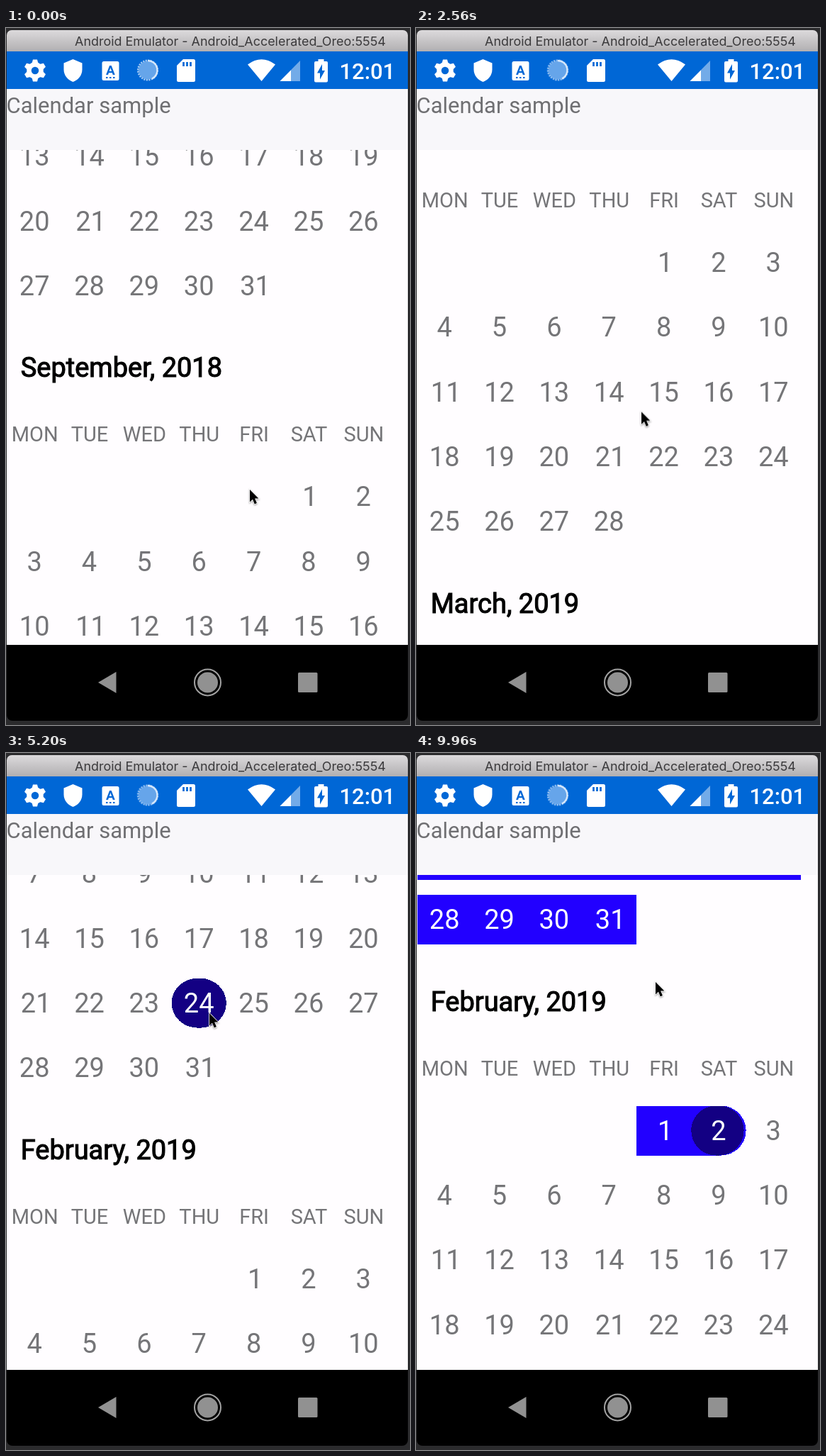
Write an HTML page that moves like this. It is 570 by 983 pixels and loops after 10000 ms.

```html
<!DOCTYPE html>
<html lang="en">
<head>
<meta charset="utf-8">
<title>Calendar sample</title>
<style>
html, body { margin: 0; width: 100%; height: 100%; overflow: hidden; background: #2b2b2d; }
svg { display: block; width: 570px; height: 983px; font-family: Roboto, sans-serif; }
.mid { text-anchor: middle; }
.day { font-size: 38px; fill: #757578; }
.week { font-size: 29px; fill: #757578; }
.month { font-size: 38px; fill: #000; stroke: #000; stroke-width: 1.1px; }
.sel { opacity: 0; animation: 10s step-end infinite; }
.sel .day { fill: #fff; }
.range, .end { shape-rendering: crispEdges; }
.range { fill: #2200ff; }
.end { fill: #130083; }
#ring { transform-origin: 200px 59.5px; animation: turn 4s linear infinite; }
#list { animation: scroll 10s linear infinite; }
#cursor { animation: point 10s linear infinite; }

@keyframes turn { to { transform: rotate(360deg); } }
@keyframes pick0 { 0% { opacity: 1; } 50.4% { opacity: 0; } }
@keyframes pick1 { 50.4% { opacity: 1; } 59.6% { opacity: 0; } }
@keyframes pick2 { 59.6% { opacity: 1; } 76% { opacity: 0; } }
@keyframes pick3 { 76% { opacity: 1; } 87.6% { opacity: 0; } }
@keyframes pick4 { 87.6%, 100% { opacity: 1; } }

/* position of the February heading */
@keyframes scroll {
  0% { transform: translateY(3884px); }
  2% { transform: translateY(3876px); }
  4.5% { transform: translateY(3600px); animation-timing-function: cubic-bezier(.33, .67, .67, 1); }
  14.8%, 23.5% { transform: translateY(99px); }
  25.6% { transform: translateY(148px); }
  29% { transform: translateY(267px); animation-timing-function: ease-out; }
  33%, 36.4% { transform: translateY(343px); }
  38.8% { transform: translateY(456px); animation-timing-function: ease-out; }
  42%, 94% { transform: translateY(559px); }
  99%, 100% { transform: translateY(350px); }
}
@keyframes point {
  0% { transform: translate(344px, 651px); }
  2% { transform: translate(344px, 645px); }
  4.5% { transform: translate(336px, 385px); }
  14.8% { transform: translate(324px, 378px); animation-timing-function: ease-in-out; }
  23.5% { transform: translate(320px, 492px); }
  25.6% { transform: translate(318px, 541px); }
  29% { transform: translate(325px, 660px); animation-timing-function: ease-in-out; }
  34%, 36.4% { transform: translate(342px, 590px); }
  38.8% { transform: translate(351px, 703px); }
  40% { transform: translate(350px, 712px); }
  42% { transform: translate(345px, 683px); animation-timing-function: ease-in-out; }
  49% { transform: translate(290px, 370px); }
  52% { transform: translate(287px, 367px); animation-timing-function: ease-in-out; }
  58%, 61% { transform: translate(430px, 745px); animation-timing-function: ease-in-out; }
  66% { transform: translate(511px, 772px); animation-timing-function: ease-in-out; }
  74.5%, 77% { transform: translate(430px, 745px); animation-timing-function: ease-in-out; }
  82.8% { transform: translate(257px, 320px); }
  86%, 89% { transform: translate(272px, 265px); animation-timing-function: ease-in-out; }
  93.5%, 94% { transform: translate(331px, 532px); }
  99%, 100% { transform: translate(338px, 323px); }
}
</style>
</head>
<body>
<svg viewBox="0 0 570 983">
  <defs>
    <linearGradient id="bar" x2="0" y2="1">
      <stop stop-color="#dcdadc"/><stop offset="1" stop-color="#b1afb1"/>
    </linearGradient>
    <clipPath id="view"><path d="M1 172H567V870H1Z"/></clipPath>
  </defs>

  <path d="M1 33V10a7 7 0 0 1 7-7H560a7 7 0 0 1 7 7V33Z" fill="url(#bar)"/>
  <text x="97" y="25" font-size="17.95" fill="#3b3a3c" style="font-family: Inter, sans-serif">Android Emulator - Android_Accelerated_Oreo:5554</text>
  <path d="M1 86H567V870H1Z" fill="#fffdff"/>
  <path d="M1 33H567V86H1Z" fill="#0067d6"/>
  <path d="M1 86H567V172H1Z" fill="#f8f7fa"/>
  <text x="0.5" y="119.5" font-size="31" fill="#6f6f72">Calendar sample</text>

  <g fill="#fff">
    <g id="gear" transform="translate(41 60)">
      <circle r="8.5" fill="none" stroke="#fff" stroke-width="6.5"/>
    </g>
    <path d="M94.500 44L107.500 49.500V58.500C107.500 66.500 102 73.500 94.500 76C87 73.500 81.500 66.500 81.500 58.500V49.500Z"/>
    <rect x="135.5" y="47" width="24" height="27" rx="2.5"/>
    <text class="mid" x="147.5" y="66" font-size="19" font-weight="700" fill="#0067d6">A</text>
    <path d="M141 70h2.500m2.500 0h2.500m2.500 0h2.500" stroke="#0067d6" stroke-width="2.2"/>
    <circle cx="200" cy="59.5" r="13" fill="#66a5ea"/>
    <circle id="ring" cx="200" cy="59.5" r="13.8" fill="none" stroke="#a5caf4" stroke-width="2.4" stroke-dasharray="2.2 1.4"/>
    <path d="M200 46a13.500 13.500 0 0 1 6 25.600" fill="none" stroke="#d5e7fb" stroke-width="2.4"/>
    <path d="M250 44H264.500a2.500 2.500 0 0 1 2.500 2.500V73.500a2.500 2.500 0 0 1-2.500 2.500H243.500a2.500 2.500 0 0 1-2.500-2.500V53Z"/>
    <path d="M250.500 48v6m5-6v6m5-6v6" stroke="#0067d6" stroke-width="2.7"/>
    <path d="M341 51.500Q360.500 37 380 51.500L360.500 75Z"/>
    <path d="M415 46V75H386.500Z" opacity=".45"/>
    <path d="M402 59.500V75H386.500Z"/>
    <path d="M440.500 47V44H448.500V47H452a2 2 0 0 1 2 2V74.500a2 2 0 0 1-2 2H437a2 2 0 0 1-2-2V49a2 2 0 0 1 2-2Z"/>
    <path d="M446 51V60H450L443 72.500V63.500H439Z" fill="#0067d6"/>
    <text x="470.5" y="71.5" font-size="31" font-weight="500">12:01</text>
  </g>

  <g clip-path="url(#view)"><g id="list"></g></g>

  <path d="M1 870H567V969a8 8 0 0 1-8 8H9a8 8 0 0 1-8-8Z"/>
  <g fill="#919191">
    <path d="M130 923L155.500 908V938Z"/>
    <circle cx="284.5" cy="923" r="14.5"/>
    <circle cx="284.5" cy="923" r="18.5" fill="none" stroke="#a2a2a2" stroke-width="2"/>
    <rect x="412" y="909" width="27.5" height="28" rx="1.5"/>
  </g>

  <g id="cursor">
    <path d="M0 0V17.500L4 13.800L6.800 20.400L9.900 19L7.100 12.600H12.400Z" stroke="#fff" stroke-width="1.6" paint-order="stroke" style="filter: drop-shadow(0 1px 1px #0006)"/>
  </g>
</svg>
<script>
const NS = 'http://www.w3.org/2000/svg';
const COL = 77.35, ROW = 91.33, CELL = 70, FIRST = 182, AFTER = 115.5;
const list = document.getElementById('list');
const days = [];

function add(parent, tag, attrs, text) {
  const el = document.createElementNS(NS, tag);
  for (const k in attrs) el.setAttribute(k, attrs[k]);
  if (text !== undefined) el.textContent = text;
  return parent.appendChild(el);
}

function box(parent, cls, x, y, width, rx = 0) {
  add(parent, 'rect', { class: cls, x, y: y - CELL / 2 + 0.5, width, height: CELL, rx });
}

// A closing 1 is centred by its narrow ink, so it sits further right.
function label(parent, d) {
  const shift = d.n % 10 === 1 ? 2 : 0;
  add(parent, 'text', { class: 'day mid', x: d.x + COL / 2 + shift, y: d.y + 13.8 }, d.n);
}

// Draws one month below its heading and returns where the next one starts.
function month(year, m, top) {
  const first = new Date(year, m, 1);
  const name = first.toLocaleString('en-US', { month: 'long' });
  const lead = (first.getDay() + 6) % 7;
  const count = new Date(year, m + 1, 0).getDate();
  add(list, 'text', { class: 'month', x: 20.7, y: top + 13.5 }, `${name}, ${first.getFullYear()}`);
  'MON TUE WED THU FRI SAT SUN'.split(' ').forEach((w, i) =>
    add(list, 'text', { class: 'week mid', x: 40.7 + COL * i, y: top + 104.5 }, w));
  let y;
  for (let n = 1; n <= count; n++) {
    const i = lead + n - 1;
    y = top + FIRST + ROW * Math.floor(i / 7);
    const d = { n, x: 1.5 + COL * (i % 7), y, time: +new Date(year, m, n) };
    days.push(d);
    label(list, d);
  }
  return y + AFTER;
}

function select(index, from, to) {
  const g = add(list, 'g', { class: 'sel', style: `animation-name: pick${index}` });
  const picked = days.filter(d => d.time >= +from && d.time <= +to);
  picked.forEach((d, i) => {
    const start = i === 0, end = i === picked.length - 1;
    if (start && end) {
      box(g, 'end', d.x, d.y, COL, 37);
    } else if (start || end) {
      box(g, 'range', d.x, d.y, COL, 35);
      box(g, 'range', start ? d.x + COL / 2 : d.x, d.y, COL / 2);
      box(g, 'end', start ? d.x + 3 : d.x, d.y, COL - 3, 35);
    } else {
      box(g, 'range', d.x, d.y, COL);
    }
    label(g, d);
  });
}

const fiveRows = FIRST + 4 * ROW + AFTER;
let nextTop = -(6 * fiveRows + ROW);
for (let m = 7; m < 16; m++) nextTop = month(2018, m, nextTop);

const jan = n => new Date(2019, 0, n);
const feb2 = new Date(2019, 1, 2);
select(0, jan(25), jan(31));
select(1, jan(24), jan(24));
select(2, jan(24), feb2);
select(3, feb2, feb2);
select(4, jan(17), feb2);

const gear = document.getElementById('gear');
for (let a = 0; a < 360; a += 60) {
  add(gear, 'path', { d: 'M-4.500 -10L-3 -15.500H3L4.500 -10Z', transform: `rotate(${a})` });
}
</script>
</body>
</html>
```
